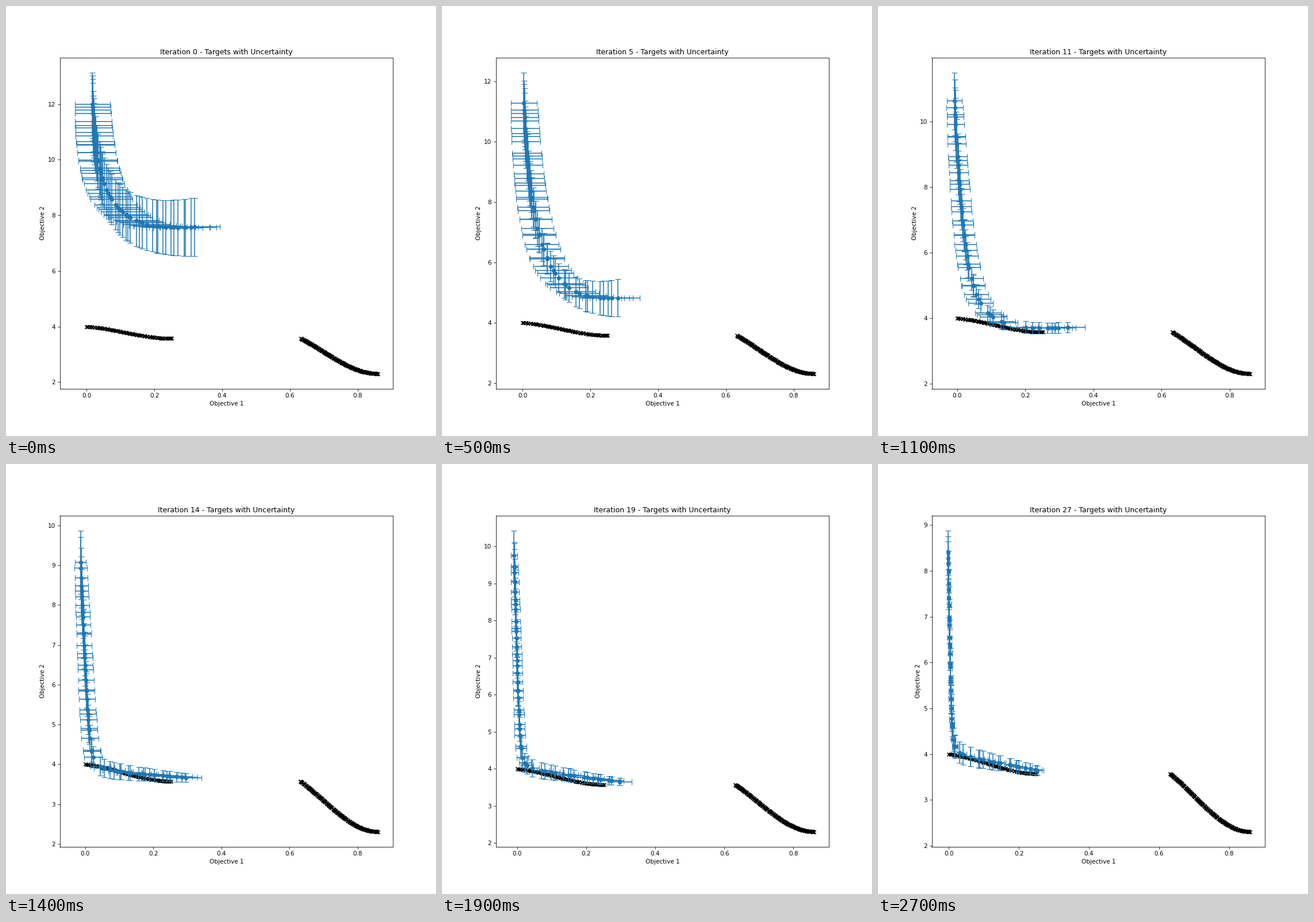
Recreate the animation shown at these times as a matplotlib script. Size 748 by 748 pixels, loop 2.8 s.

```python
import numpy as np
import matplotlib.pyplot as plt
from matplotlib.animation import FuncAnimation

STEPS = 28
COUNT = 49
T = np.linspace(0, 1, 2000)

# Key values of the front's extent, eased linearly between these steps
KEYS = [0, 5, 9, 14, 17, 19, 24, 27]
LEFT = [-.0347, -.0347, -.0304, -.0304, -.024, -.0186, -.0097, -.0057]
TOP = [13.13, 12.28, 12.59, 9.87, 9.5, 10.42, 9.7, 8.88]
END = [.318, .281, .343, .2955, .29, .2965, .182, .2525]


def spread(rng, low, high, count):
    """Uneven but ordered positions from low to high."""
    u = np.arange(count) + rng.uniform(-0.6, 0.6, count)
    u[0], u[-1] = 0, count - 1
    return low + (high - low) * np.clip(u / (count - 1), 0, 1)


def optimum():
    """Two branches of the exact optimal front."""
    rng = np.random.default_rng(4)
    x = np.r_[spread(rng, 0, 0.2514, 72), spread(rng, 0.6316, 0.8594, 140)]
    return x, 4 - x * (1 + np.sin(3 * np.pi * x))


def front(step, left, top, end):
    """Sample the front: a rational curve from a steep arm round a corner to a flat arm."""
    turn = 1 / (1 + np.exp(13 - step))  # the corner sharpens half-way
    ex0 = 0.052 * np.exp(-(step / 12.5) ** 1.3)
    ex1 = 0.075 - 0.0021 * step
    ey0 = 1.13 - 0.024 * step
    ey_corner = 0.23 + 0.55 * np.exp(-step / 2)
    ey1 = 0.1 + 0.95 * np.exp(-(step / 6.5) ** 2)

    x0, y0 = left + ex0, top - ey0
    x1, y1 = end, 3.65 + 3.93 * np.exp(-(step / 4.4) ** 1.5)
    xc, yc = 0.03 - 0.022 * turn, y1 - 0.25 + 0.6 * turn
    a, b, c = (1 - T) ** 2, 2 * (1.4 + 10 * turn) * T * (1 - T), T ** 2
    x = (a * x0 + b * xc + c * x1) / (a + b + c)
    y = (a * y0 + b * yc + c * y1) / (a + b + c)

    # new population at every step, even along the curve
    length = np.r_[0, np.cumsum(np.hypot(12 * np.diff(x), np.diff(y)))]
    at = spread(np.random.default_rng(step), 0, length[-1], COUNT)
    x, y = np.interp(at, length, x), np.interp(at, length, y)

    # a hole opens in the flat arm and closes again
    hole = 0.17 * np.exp(-((step - 9) / 1.5) ** 2)
    keep = (x < 0.16) | (x > 0.16 + hole)
    x, y = x[keep], y[keep]

    along = np.clip((x - x0) / (x1 - x0), 0, 1)
    height = (y - y1) / (y0 - y1)
    ex = ex0 + (ex1 - ex0) * np.sqrt(along)
    ey = ey_corner + (ey1 - ey_corner) * along + (ey0 - ey_corner) * height
    return x, y, ex, ey


def padded(low, high):
    pad = 0.05 * (high - low)
    return low - pad, high + pad


best_x, best_y = optimum()
fig, ax = plt.subplots(figsize=(10, 10), dpi=74.8)


def draw(step):
    left, top, end = (np.interp(step, KEYS, track) for track in (LEFT, TOP, END))
    x, y, ex, ey = front(step, left, top, end)
    ax.clear()
    ax.errorbar(x, y, xerr=ex, yerr=ey, fmt="o", color="C0", capsize=5)
    ax.scatter(best_x, best_y, color="black", marker="x")
    ax.set_xlim(*padded(left, best_x.max()))
    ax.set_ylim(*padded(best_y.min(), top))
    ax.set_title(f"Iteration {step} - Targets with Uncertainty")
    ax.set_xlabel("Objective 1")
    ax.set_ylabel("Objective 2")
    return []


anim = FuncAnimation(fig, draw, frames=STEPS, interval=100, init_func=lambda: [],
                     repeat=True, repeat_delay=0)
plt.show()
```
